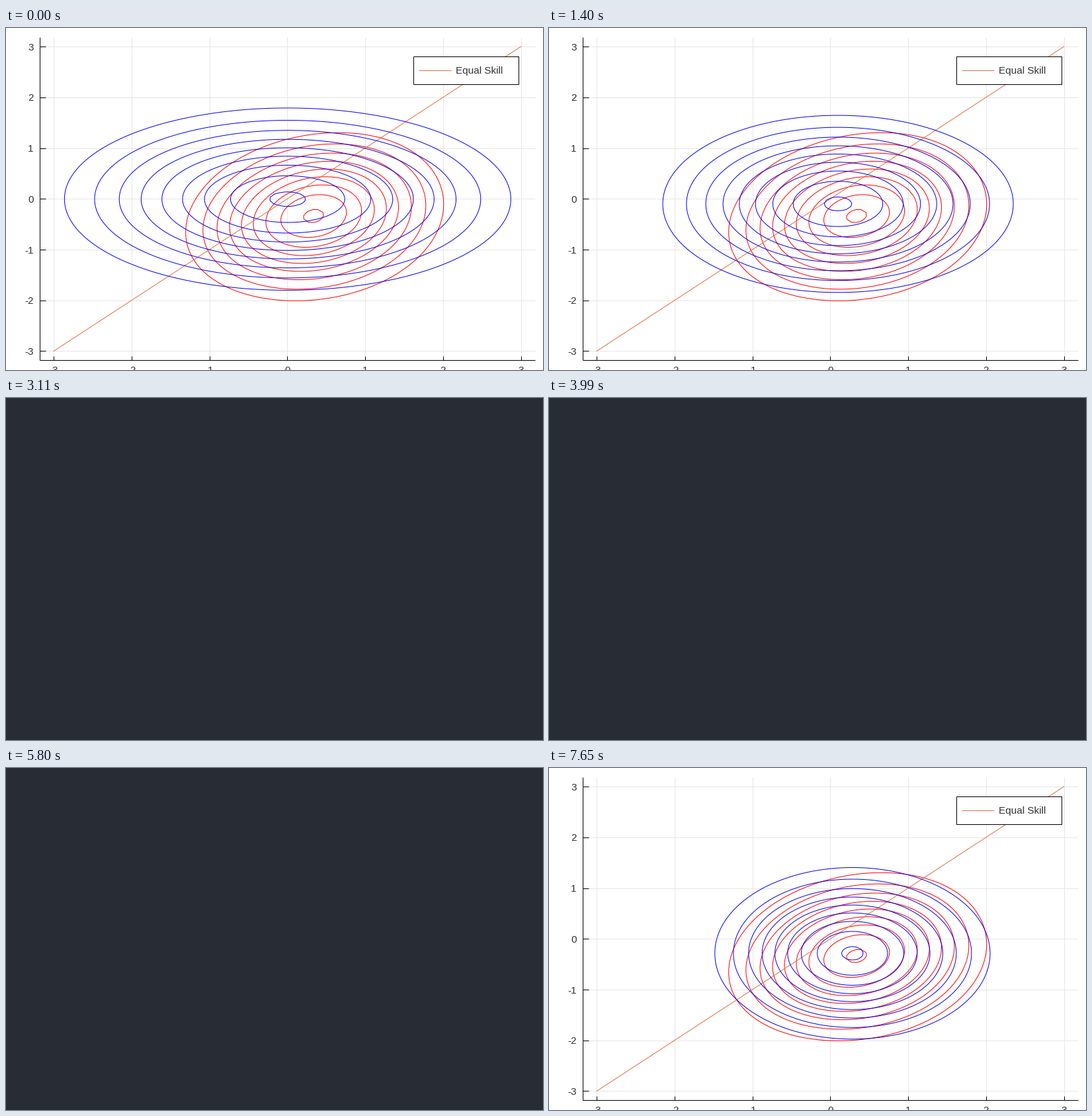
A matplotlib script that plays this animation: 812 by 517 pixels, repeating every 8 s.

```python
import numpy as np
import matplotlib.pyplot as plt
from matplotlib.animation import FuncAnimation
from matplotlib.patches import Rectangle

W, H, DPI = 812, 517, 64
PT = 72 / DPI                      # points per pixel
X0, Y0, SX, SY = 425.3, 258.3, 117.75, 76.72
STEP, LOOP = 20, 8000              # ms

LEVELS = [0.2, 0.3, 0.4, 0.5, 0.6, 0.7, 0.8, 0.9, 0.99]
STARTS = [0, 620, 1400, 2330, 3200, 4060, 4940, 5880, 6810, 7650]
BLANKS = [(460, 620), (1320, 1400), (2260, 2330), (3110, 3200), (3990, 4060),
          (5800, 5880), (6730, 6810), (7570, 7650)]
INK = "#333333"
ORANGE = "#e26f46"

plt.rcParams["font.family"] = "Liberation Sans"
fig = plt.figure(figsize=(W / DPI, H / DPI), dpi=DPI, facecolor="white")
ax = fig.add_axes([0, 0, 1, 1])
ax.axis("off")


def ux(px):
    return (px - X0) / SX


def uy(py):
    return (Y0 - py) / SY


def line(x1, y1, x2, y2, color, z):
    ax.plot([ux(x1), ux(x2)], [uy(y1), uy(y2)], color=color, lw=PT,
            zorder=z, solid_capstyle="butt")


def label(x, y, s, ha):
    ax.text(ux(x), uy(y), s, ha=ha, va="center_baseline", color=INK,
            fontsize=15.3 * PT, zorder=7)


def contours(z, color, order):
    return ax.contour(gx, gy, z, levels=np.array(LEVELS) * z.max(),
                      colors=color, linewidths=PT, zorder=order)


# axes, grid and ticks
L, R, T, B = 50.5, 800, 14, 502
for k in range(-3, 4):
    x, y = X0 + k * SX, Y0 - k * SY
    line(x, T, x, B, "#e6e6e6", 1)
    line(L, y, R, y, "#e6e6e6", 1)
    line(x, B, x, B - 6, "black", 2)
    line(L, y, L + 9, y, "black", 2)
    label(41.5, y, str(k), "right")
    label(x, 517, str(k), "center")
line(L, T, L, B, "black", 2)
line(L, B, R, B, "black", 2)

# posterior of two skills after one game won by the first player
grid = np.linspace(-3, 3, 100)
gx, gy = np.meshgrid(grid, grid)
target = np.exp(-(gx**2 + gy**2) / 2) / (1 + np.exp(gy - gx))
contours(target, "red", 3)
ax.plot([-3, 3], [-3, 3], color=ORANGE, lw=PT, zorder=4)


def approx(n):
    """Gaussian after n rounds of fitting; precisions relax exponentially."""
    mu = 0.4 * (1 - np.exp(-0.137 * n - 0.012))
    wx = 1.18 - 0.788 * np.exp(-0.185 * n)
    wy = 1.14 - 0.141 * np.exp(-0.27 * n)
    return np.exp(-(wx * (gx - mu)**2 + wy * (gy + mu)**2) / 2)


fits = [contours(approx(n), "blue", 5) for n in range(len(STARTS))]

# legend
ax.add_patch(Rectangle((ux(615.5), uy(84.5)), 159.5 / SX, 42 / SY, fc="white",
                       ec="black", lw=PT, zorder=6))
line(624, 63.5, 673, 63.5, ORANGE, 7)
label(680, 63.5, "Equal Skill", "left")

cover = Rectangle((0, 0), 1, 1, transform=fig.transFigure, fc="#282c34",
                  ec="none", zorder=10)
ax.add_patch(cover)
ax.set_xlim(ux(0), ux(W))
ax.set_ylim(uy(H), uy(0))


def draw(i):
    t = i * STEP + STEP / 2
    now = sum(t >= s for s in STARTS) - 1
    for n, fit in enumerate(fits):
        fit.set_visible(n == now)
    cover.set_visible(any(a <= t < b for a, b in BLANKS))
    return [*fits, cover]


anim = FuncAnimation(fig, draw, frames=LOOP // STEP, interval=STEP,
                     init_func=lambda: draw(0), repeat=True, repeat_delay=0)
plt.show()
```
